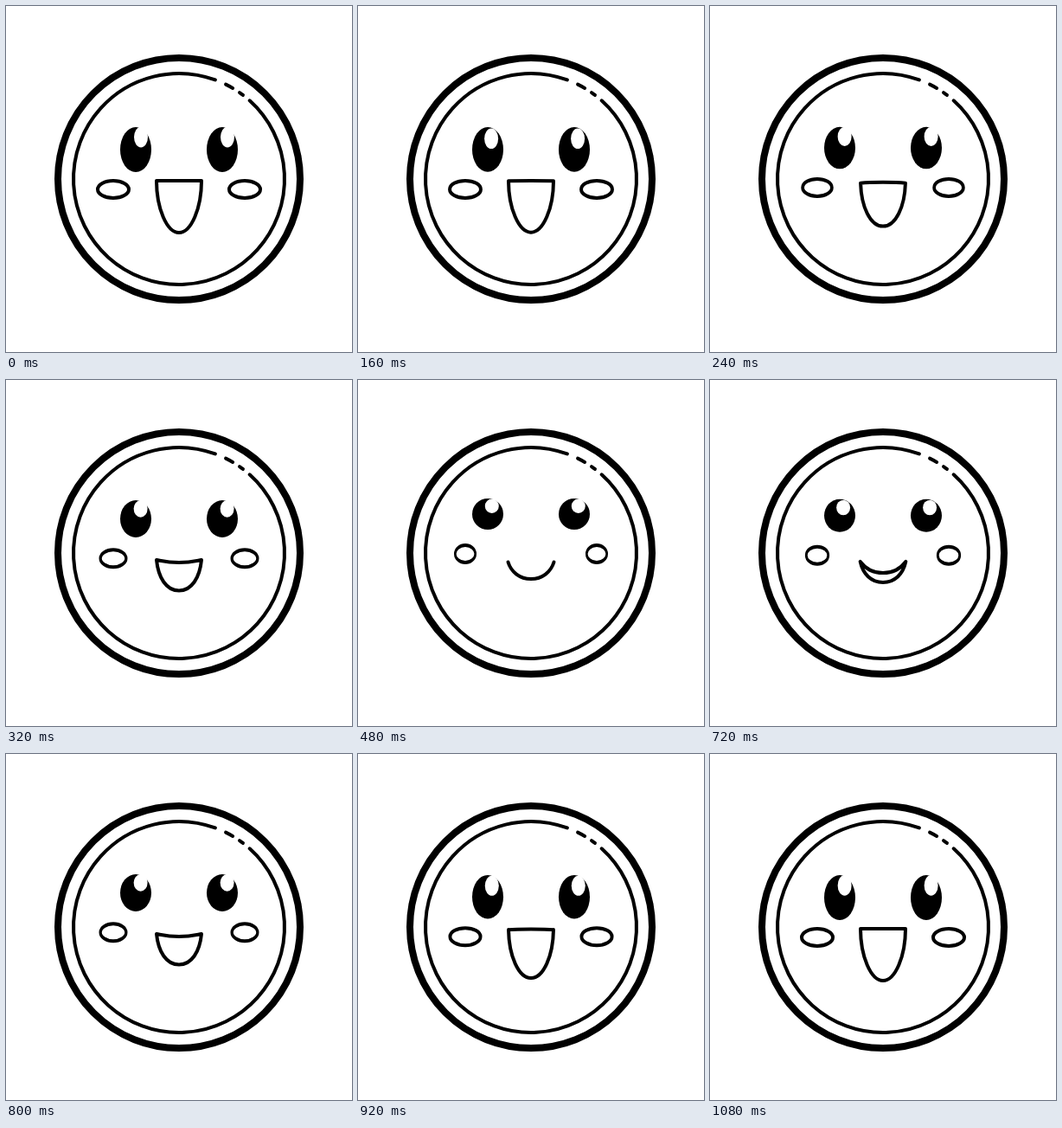
An HTML page that plays this animation: 400 px wide and 400 px high, repeating every 1120 ms.

```html
<!DOCTYPE html>
<html lang="en">
<head>
<meta charset="utf-8">
<title>Smiling face</title>
<style>
  html, body { margin: 0; width: 100%; height: 100%; overflow: hidden; background: #fff; }
  svg { display: block; width: 100%; height: 100%; }
  .line { fill: none; stroke: #000; stroke-width: 4; stroke-linecap: round; stroke-linejoin: round; }
</style>
</head>
<body>
<svg viewBox="0 0 400 400">
  <circle class="line" cx="200" cy="200" r="140" style="stroke-width:8"/>
  <circle class="line" cx="200" cy="200" r="122" pathLength="360"
    stroke-dasharray="338.1 6.2 4.3 4.4 2.3 4.7" transform="rotate(-48 200 200)"/>
  <defs>
    <g id="eye">
      <ellipse id="ball" cx="150" rx="18"/>
      <ellipse id="shine" rx="8" fill="#fff"/>
    </g>
    <ellipse id="cheek" class="line" rx="18" ry="10"/>
  </defs>
  <use href="#eye"/>
  <use href="#eye" x="100"/>
  <use href="#cheek" x="0"/>
  <use href="#cheek" x="152"/>
  <path id="mouth" class="line"/>
</svg>
<script>
  const LOOP = 1120, STEP = 40, HALF = LOOP / 2;
  const CLOSE_START = 140, CLOSE_END = 480;
  const MID = 0.544; // progress at which the middle pose is reached

  const el = id => document.getElementById(id);
  const ball = el('ball'), shine = el('shine'), cheek = el('cheek'), mouth = el('mouth');

  function set(node, attrs) {
    for (const key in attrs) node.setAttribute(key, attrs[key]);
  }

  // Curve through the open, middle and closed values.
  function blend(p, open, mid, closed) {
    const line = open + (closed - open) * MID;
    const bend = (mid - line) / (MID * (1 - MID));
    return open + (closed - open) * p + bend * p * (1 - p);
  }

  function closing(t) {
    const there = t < HALF ? t : LOOP - t;
    const u = Math.min(1, Math.max(0, (there - CLOSE_START) / (CLOSE_END - CLOSE_START)));
    return u * u * (3 - 2 * u);
  }

  // Half a lip on the left, mirrored to the right.
  function lip(x, y, x1, y1, x2, bottom) {
    return `M${x} ${y}C${x1} ${y1} ${x2} ${bottom} 200 ${bottom}` +
      `C${400 - x2} ${bottom} ${400 - x1} ${y1} ${400 - x} ${y}`;
  }

  function draw(t) {
    const p = closing(t);
    const at = (a, b, c) => blend(p, a, b, c);

    const cy = at(166, 160.5, 155), ry = at(26, 21.5, 18), squash = ry / 18;
    const sway = Math.cos(t / LOOP * 8 * Math.PI);
    set(ball, { cy, ry });
    set(shine, {
      cx: 155 + sway,
      cy: cy - (9.35 + 0.65 * sway) * squash,
      ry: 8.2 * squash
    });

    set(cheek, {
      transform: `translate(124 ${at(212, 206.3, 201)}) scale(${at(1, 0.825, 0.65)} 1)`
    });

    const x = at(174, 174, 173.5), y = at(202, 208, 210.5);
    const lower = lip(x, y, at(174, 176, 177), at(234, 228, 222), at(186, 185, 187), at(262, 243.5, 230));
    const upper = lip(x, y, at(178, 182, 177), at(202, 209.5, 222), 187, at(202, 211, 230));
    set(mouth, { d: lower + upper });
  }

  const start = performance.now();
  function tick() {
    const t = (performance.now() - start) % LOOP;
    draw(Math.floor(t / STEP) * STEP);
    requestAnimationFrame(tick);
  }
  tick();
</script>
</body>
</html>
```
